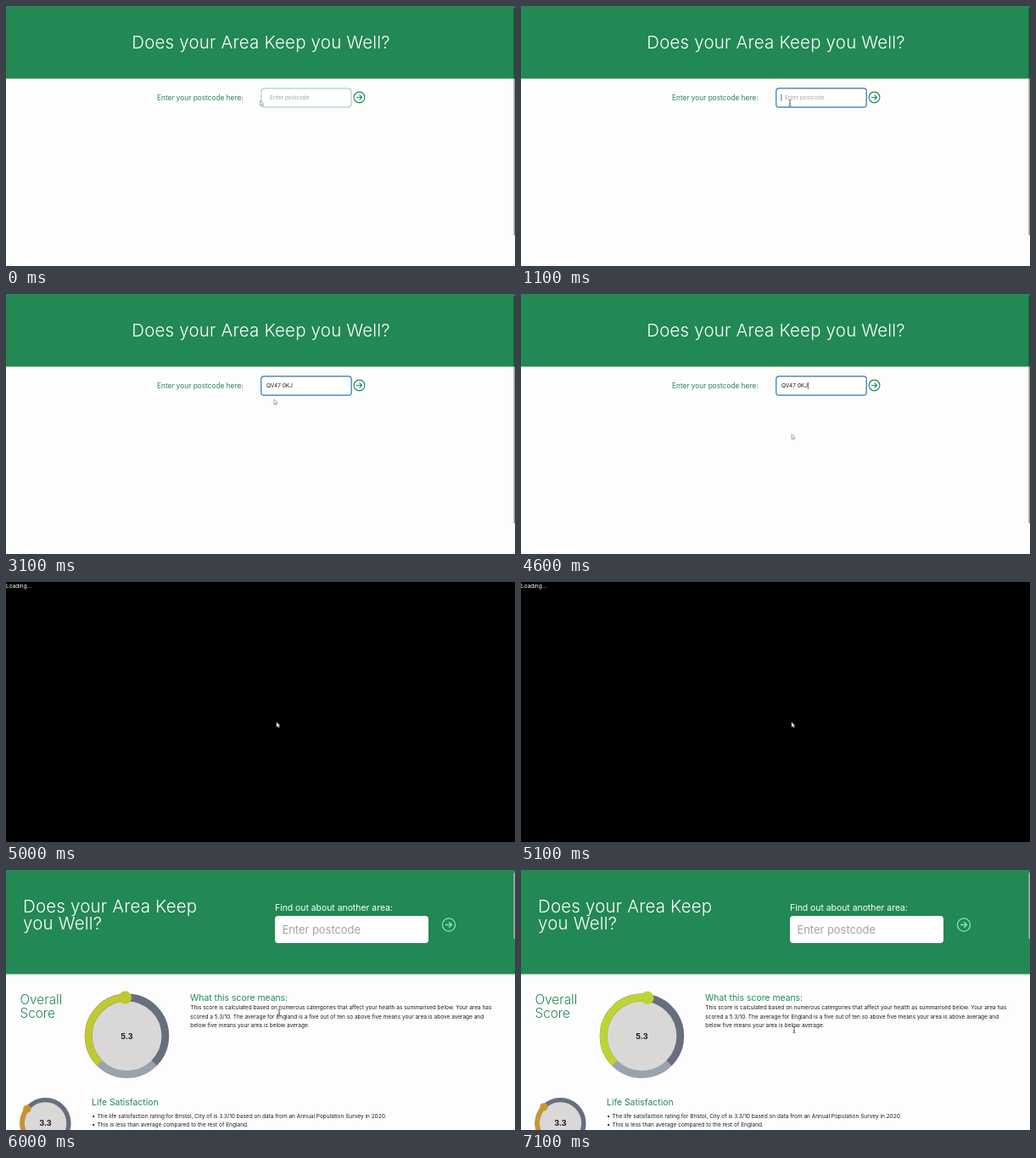
An HTML page that plays this animation: 600 px wide and 306 px high, repeating every 7.2 s.

```html
<!DOCTYPE html>
<html lang="en">
<head>
<meta charset="utf-8">
<title>Area health score</title>
<style>
  html, body { margin: 0; width: 100%; height: 100%; overflow: hidden; background: #fdfdfd; }
  svg { display: block; width: 100vw; height: 100vh; }
  text { font-family: Inter, "Open Sans", sans-serif; font-size: 6.5px; fill: #1c1c1c; white-space: pre; }
  .title { font-size: 20.5px; font-weight: 350; letter-spacing: .18px; fill: #fff; }
  .side { font-size: 15.3px; font-weight: 300; fill: #228854; }
  .head { font-size: 10.4px; fill: #228854; }
  .label { font-size: 8.3px; fill: #228854; }
  .hint { fill: #a3a3a3; }
  .score { font-size: 9.2px; font-weight: 700; text-anchor: middle; }
  .green { fill: #228854; }
  .icon { fill: none; stroke-linecap: round; stroke-linejoin: round; }
  .ring { fill: none; }
</style>
</head>
<body>
<svg viewBox="0 0 600 306" preserveAspectRatio="none">
  <defs>
    <g id="go" class="icon">
      <circle r="6.4"/>
      <path d="M-3 0H3M.4-2.6 3 0 .4 2.6"/>
    </g>
    <linearGradient id="shade" x2="0" y2="1">
      <stop stop-color="#000" stop-opacity=".16"/>
      <stop offset="1" stop-color="#000" stop-opacity="0"/>
    </linearGradient>
  </defs>

  <g id="form">
    <rect width="600" height="306" fill="#fdfdfd"/>
    <rect class="green" width="600" height="85.5"/>
    <text class="title" x="300.5" y="49.5" text-anchor="middle">Does your Area Keep you Well?</text>
    <text class="label" x="178" y="110.6">Enter your postcode here:</text>
    <rect id="field" rx="3.2" fill="#fff"/>
    <text id="hint" class="hint" x="311" y="110.3">Enter postcode</text>
    <text id="typed" x="307" y="110.3"></text>
    <rect id="caret" y="103.8" width=".7" height="8" fill="#222"/>
    <use href="#go" x="416.5" y="107.5" stroke="#228854" stroke-width="1.15"/>
    <rect x="598.4" y="2" width="1.6" height="268" rx=".8" fill="#000" opacity=".4"/>
  </g>

  <g id="loading">
    <rect width="600" height="306"/>
    <text x="0" y="6.6" style="fill:#fff">Loading...</text>
  </g>

  <g id="result">
    <rect width="600" height="306" fill="#fdfdfd"/>
    <rect y="122" width="600" height="3" fill="url(#shade)"/>
    <rect class="green" width="600" height="122.4"/>
    <text class="title" x="20" y="50">Does your Area Keep</text>
    <text class="title" x="20" y="69.8">you Well?</text>
    <text class="head" x="317" y="47.8" style="fill:#fff">Find out about another area:</text>
    <rect x="317" y="54" width="181" height="32" rx="4" fill="#fff"/>
    <text class="hint" x="325.5" y="74.7" style="font-size:12.9px">Enter postcode</text>
    <use href="#go" transform="translate(522 64.5) scale(1.18)" stroke="#8ce6b0" stroke-width="1.1"/>
    <rect x="598.4" y="3" width="1.6" height="78" rx=".8" fill="#a9b5ae"/>
    <text class="side" x="16.5" y="158">Overall</text>
    <text class="side" x="16.5" y="174.3">Score</text>
    <text class="head" x="217" y="154">What this score means:</text>
    <text x="217.3" y="164.4">This score is calculated based on numerous catergories that affect your health as summarised below. Your area has</text>
    <text x="217.3" y="174.5">scored a 5.3/10. The average for England is a five out of ten so above five means your area is above average and</text>
    <text x="217.3" y="184.6">below five means your area is below average.</text>
    <text class="head" x="101" y="276.5">Life Satisfaction</text>
    <circle cx="103.2" cy="290" r="1.1"/>
    <text x="107.6" y="292.3">The life satisfaction rating for Bristol, City of is 3.3/10 based on data from an Annual Population Survey in 2020.</text>
    <circle cx="103.2" cy="300" r="1.1"/>
    <text x="107.6" y="302.3">This is less than average compared to the rest of England.</text>
    <g id="gauges"></g>
  </g>

  <path id="arrow" d="M0 0V5.8L1.3 4.6 2.2 6.6 3.2 6.1 2.3 4.2H4.1Z" fill="#fff" stroke="#777" stroke-width=".6"/>
  <path id="beam" d="M-1.6-3.6Q0-3.6 0-2.6V2.6Q0 3.6-1.6 3.6M1.6-3.6Q0-3.6 0-2.6M0 2.6Q0 3.6 1.6 3.6M-.8 .9H.8" fill="none" stroke="#333" stroke-width=".7"/>
</svg>

<script>
const LOOP = 7200, STEP = 100;
const REVEAL = 5500, SWEEP = 700, FIRST = .44;
const CODE = "QV47 0KJ";
const $ = id => document.getElementById(id);
const clamp = v => Math.max(0, Math.min(1, v));
const set = (el, attrs) => { for (const k in attrs) el.setAttribute(k, attrs[k]); };
const show = (el, on) => { el.style.display = on ? "" : "none"; };

// Rows are [time or value, ...numbers], blended linearly.
function blend(rows, at) {
  let i = 0;
  while (i < rows.length - 2 && at >= rows[i + 1][0]) i++;
  const [a, b] = [rows[i], rows[i + 1]];
  const p = clamp((at - a[0]) / (b[0] - a[0]));
  return a.slice(1).map((v, k) => v + (b[k + 1] - v) * p);
}

// Rows are [time, value], each held until the next.
const hold = (rows, t) => rows.filter(r => r[0] <= t).pop()[1];

const POINTER = [
  [0, 299.6, 111.5], [100, 300, 112], [600, 317, 114], [2900, 317, 114],
  [3000, 317, 117], [3100, 316, 124], [3200, 317, 148], [3600, 319, 162],
  [3800, 319, 165], [5400, 319, 165], [REVEAL, 322, 168], [6300, 322, 168],
  [6800, 322, 188]
];
const SHAPE = [[0, "arrow"], [200, "beam"], [1600, ""], [3000, "beam"], [3100, "arrow"], [REVEAL, "beam"]];
const CARET = [[0, 0], [700, 1], [1300, 0], [1600, 1], [3000, 0], [3500, 1], [4100, 0], [4500, .5], [4600, 1]];
const SCENE = [[0, "form"], [5000, "loading"], [REVEAL, "result"]];
const TINT = [[.4, 220, 68, 20], [3.3, 198, 154, 48], [5.3, 190, 212, 50]];

const polar = (g, deg) => {
  const a = deg * Math.PI / 180;
  return [g.x + g.r * Math.cos(a), g.y + g.r * Math.sin(a)];
};
const arc = (g, from, to) =>
  `M${polar(g, from)}A${g.r} ${g.r} 0 ${to - from > 180 ? 1 : 0} 1 ${polar(g, to)}`;

function add(tag, attrs) {
  const el = document.createElementNS("http://www.w3.org/2000/svg", tag);
  set(el, attrs);
  $("gauges").append(el);
  return el;
}

function makeGauge(g) {
  const band = (from, to, stroke) =>
    add("path", { class: "ring", d: arc(g, from, to), stroke, "stroke-width": g.w });
  add("circle", { cx: g.x, cy: g.y, r: g.r, fill: "#d9d8d7" });
  band(45, 135, "#9aa2ad");
  band(135, 405, "#676e7e");
  g.bar = band(135, 136, "#000");
  g.dot = add("circle", { r: g.knob });
  add("text", { class: "score", x: g.x, y: g.y + 3.4 }).textContent = g.score.toFixed(1);
  return g;
}

const gauges = [
  { x: 142.5, y: 195.3, r: 45.3, w: 8.8, knob: 7.6, score: 5.3 },
  { x: 46.5, y: 298, r: 27.4, w: 5.4, knob: 4.7, score: 3.3 }
].map(makeGauge);

function drawGauge(g, t) {
  const p = clamp((t - REVEAL) / SWEEP);
  const ease = 1 - (1 - p) ** 2;
  const value = FIRST + (g.score - FIRST) * ease;
  const deg = 135 + 27 * value;
  const color = `rgb(${blend(TINT, value).map(Math.round)})`;
  const [cx, cy] = polar(g, deg);
  set(g.bar, { d: arc(g, 135, deg), stroke: color });
  set(g.dot, { cx, cy, fill: color });
}

function drawForm(t) {
  const focus = t >= 700;
  set($("field"), focus
    ? { x: 300.8, y: 96.8, width: 106.4, height: 22.4, stroke: "#2c76b3", "stroke-width": 1.2 }
    : { x: 301, y: 97, width: 106, height: 22, stroke: "#7dbb9b", "stroke-width": .8 });
  const count = Math.max(0, Math.floor((t - 1700) / 150) + 1);
  const typed = $("typed");
  typed.textContent = CODE.slice(0, count);
  show($("hint"), !count);
  const width = count ? typed.getComputedTextLength() : -.4;
  set($("caret"), { x: 307 + width, opacity: hold(CARET, t) });
}

function draw(t) {
  const scene = hold(SCENE, t);
  for (const [, name] of SCENE) show($(name), name === scene);
  if (scene === "form") drawForm(t);
  if (scene === "result") gauges.forEach(g => drawGauge(g, t));
  const shape = hold(SHAPE, t), place = blend(POINTER, t);
  for (const name of ["arrow", "beam"]) {
    show($(name), name === shape);
    set($(name), { transform: `translate(${place})` });
  }
}

const start = performance.now();
function tick() {
  const t = (performance.now() - start) % LOOP;
  draw(Math.floor(t / STEP) * STEP);
  requestAnimationFrame(tick);
}
tick();
</script>
</body>
</html>
```
